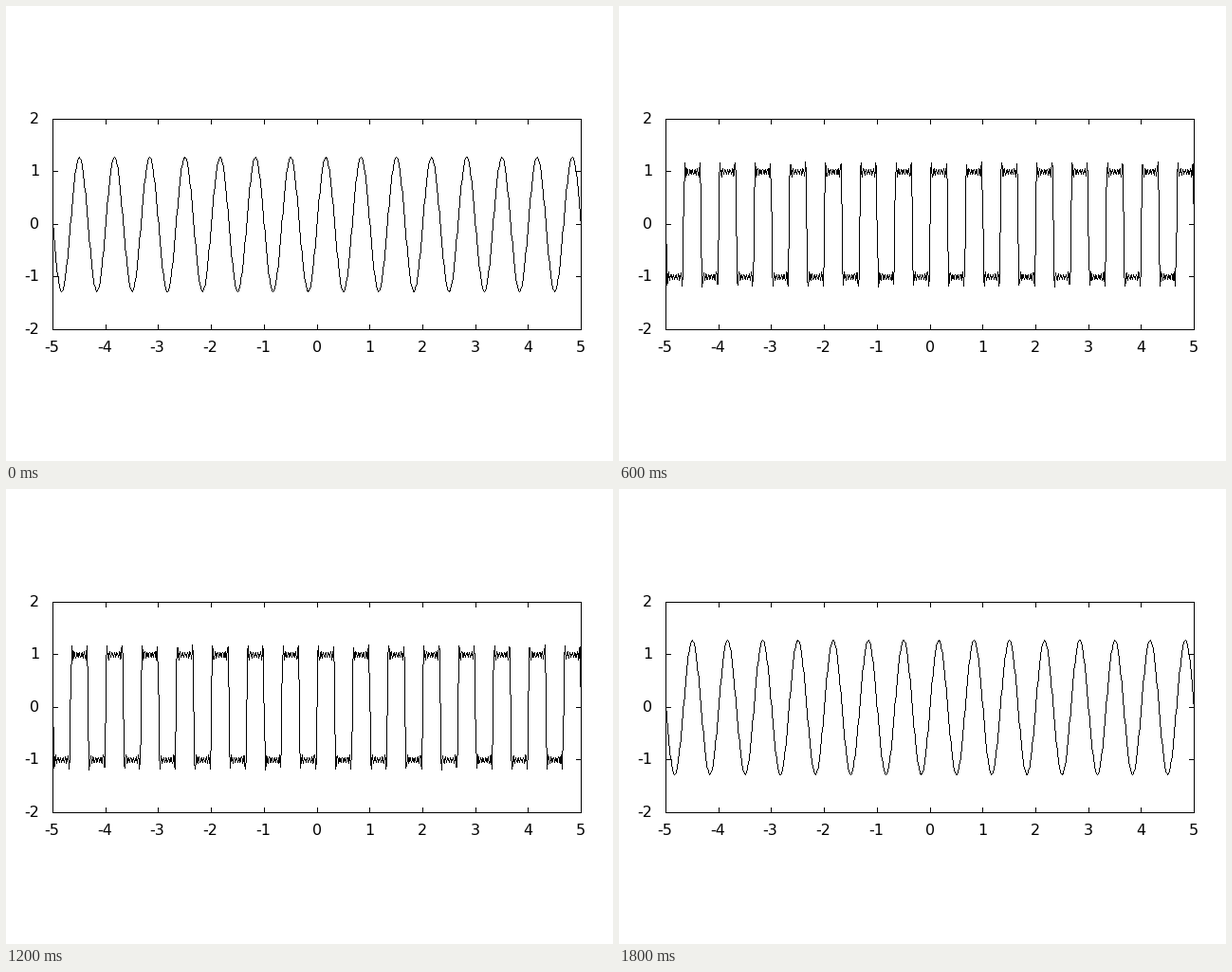
A matplotlib script that plays this animation: 640 px wide and 480 px high, repeating every 1.9 s.

```python
"""Fourier partial sums of a square wave: terms are added one by one, then removed."""
import matplotlib.pyplot as plt
import numpy as np
from matplotlib.animation import FuncAnimation

W, H, DPI = 640, 480, 100
LEFT, RIGHT, TOP, BOTTOM = 49, 606, 119, 341   # plot border, in pixels
TICK = 5
SAMPLES = 1000
FRAMES, INTERVAL = 19, 100
BLACK, WHITE = 0, 255


def to_col(x):
    """Pixel column of x, where the border spans -5 to 5."""
    return np.floor(LEFT + (x + 5) * (RIGHT - LEFT) / 10 + 0.5).astype(int)


def to_row(y):
    """Pixel row of y, where the border spans -2 to 2; halves round upwards."""
    return np.ceil(BOTTOM - (y + 2) * (BOTTOM - TOP) / 4 - 0.5).astype(int)


def stroke(canvas, c0, r0, c1, r1):
    """Draw a one pixel wide line without smoothing, from top to bottom."""
    if r0 > r1:
        c0, r0, c1, r1 = c1, r1, c0, r0
    n = max(abs(c1 - c0), r1 - r0, 1)
    k = np.arange(n + 1)
    cols = c0 + np.sign(c1 - c0) * ((2 * k * abs(c1 - c0) + n) // (2 * n))
    rows = r0 + (2 * k * (r1 - r0) + n) // (2 * n)
    canvas[rows, cols] = BLACK


def square_wave(x, terms):
    odd = 2 * np.arange(terms)[:, None] + 1
    return 4 / np.pi * (np.sin(3 * np.pi * odd * x) / odd).sum(axis=0)


def label(col, row, value):
    """Put a number with its pen start at col and its baseline at row."""
    fig.text(col / W, 1 - row / H, str(value), ha="left", va="baseline",
             family="DejaVu Sans", size=16 * 72 / DPI, color="black")


def draw_axes():
    canvas = np.full((H, W), WHITE, dtype=np.uint8)
    canvas[[TOP, BOTTOM], LEFT:RIGHT + 1] = BLACK
    canvas[TOP:BOTTOM + 1, [LEFT, RIGHT]] = BLACK
    for x in range(-5, 6):
        col = to_col(x)
        canvas[TOP:TOP + TICK + 1, col] = BLACK
        canvas[BOTTOM - TICK:BOTTOM + 1, col] = BLACK
        label(col - (9 if x < 0 else 5), 365, x)
    for y in range(-2, 3):
        row = to_row(y)
        canvas[row, LEFT:LEFT + TICK + 1] = BLACK
        canvas[row, RIGHT - TICK:RIGHT + 1] = BLACK
        label(19 if y < 0 else 25, row + 5, y)
    return canvas


fig = plt.figure(figsize=(W / DPI, H / DPI), dpi=DPI, facecolor="white")
axes = draw_axes()
picture = fig.figimage(axes, cmap="gray", vmin=BLACK, vmax=WHITE, origin="upper")

xs = np.linspace(-5, 5, SAMPLES)
cols = to_col(xs)


def update(i):
    terms = min(i + 1, FRAMES - i)
    rows = to_row(square_wave(xs, terms))
    canvas = axes.copy()
    for segment in zip(cols[:-1], rows[:-1], cols[1:], rows[1:]):
        stroke(canvas, *segment)
    picture.set_data(canvas)
    return [picture]


anim = FuncAnimation(fig, update, frames=FRAMES, interval=INTERVAL,
                     repeat=True, repeat_delay=0, blit=False)
plt.show()
```
